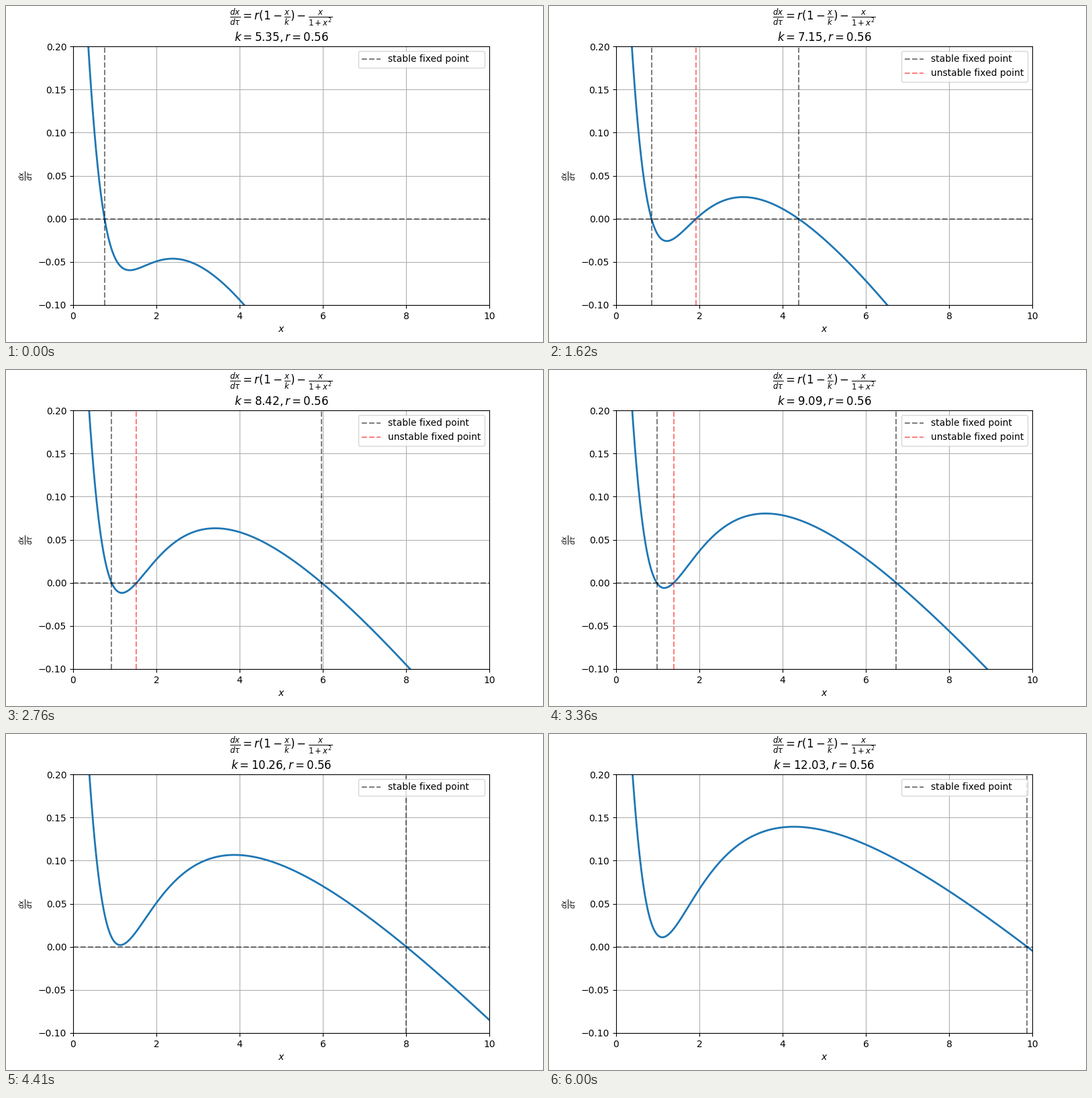
Write a matplotlib script that moves like this. It is 800 by 500 pixels and loops after 6.03 s.

```python
import numpy as np
import matplotlib.pyplot as plt
from matplotlib.animation import FuncAnimation

FRAMES = 201
R = 0.56
K = np.linspace(5.35, 12.03, FRAMES)
X = np.linspace(0, 10, 1000)
EQUATION = r"$\frac{dx}{d\tau} = r(1-\frac{x}{k}) - \frac{x}{1+x^2}$"


def rate(x, k):
    return R * (1 - x / k) - x / (1 + x**2)


def fixed_points(k):
    """Real roots in ascending order; stability alternates along them."""
    roots = np.roots([-R / k, R, -R / k - 1, R])
    return np.sort(roots[np.abs(roots.imag) < 1e-9].real)


fig, ax = plt.subplots(figsize=(8, 5), dpi=100)
ax.set_xlim(0, 10)
ax.set_ylim(-0.1, 0.2)
ax.set_xlabel("$x$")
ax.set_ylabel(r"$\frac{dx}{d\tau}$")
ax.grid()

curve, = ax.plot(X, rate(X, K[0]), lw=2)
dashed = dict(ls="--", alpha=0.5)
ax.axhline(0, color="k", **dashed)
low, high = (ax.axvline(0, color="k", **dashed) for _ in range(2))
middle = ax.axvline(0, color="r", **dashed)

# Trailing spaces keep both legend boxes equally wide.
names = ["stable fixed point    ", "unstable fixed point"]
single = ax.legend([low], names[:1], loc="upper right")
ax.add_artist(single)
double = ax.legend([low, middle], names, loc="upper right")


def update(i):
    k = K[i]
    points = fixed_points(k)
    bistable = len(points) == 3

    curve.set_ydata(rate(X, k))
    low.set_xdata([points[0]] * 2)
    if bistable:
        middle.set_xdata([points[1]] * 2)
        high.set_xdata([points[2]] * 2)
    for artist in (middle, high, double):
        artist.set_visible(bistable)
    single.set_visible(not bistable)
    ax.set_title(f"{EQUATION}\n$k={k:.2f}, r={R:.2f}$")


anim = FuncAnimation(fig, update, frames=FRAMES, interval=30,
                     repeat=True, repeat_delay=0)
plt.show()
```
